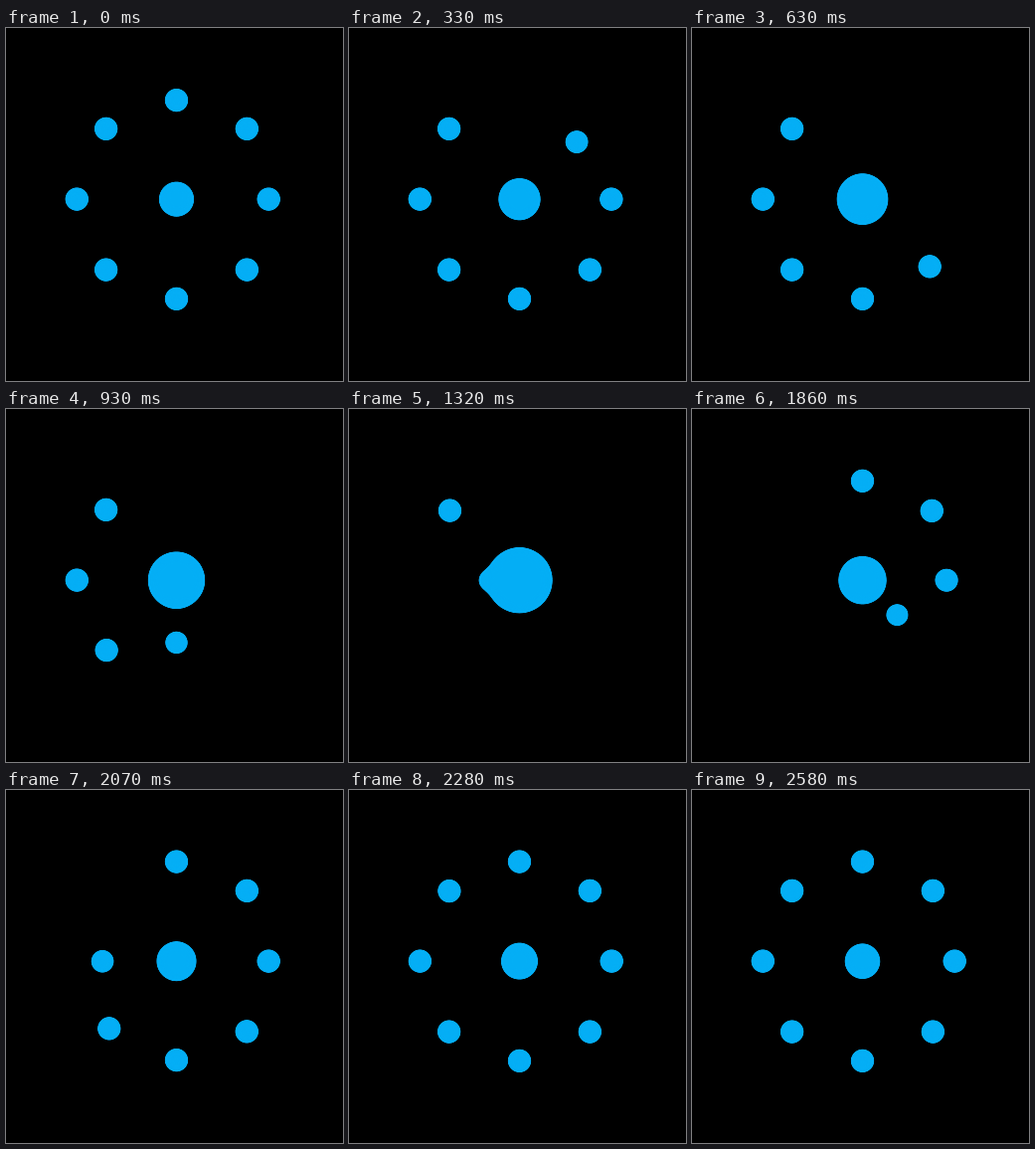
Recreate the animation shown at these times as an HTML page. Size 339x355 px, loop 2.61 s.

```html
<!DOCTYPE html>
<html lang="en">
<head>
<meta charset="utf-8">
<title>Gooey dots</title>
<style>
  html, body { margin: 0; width: 100%; height: 100%; overflow: hidden; background: #000; }
  svg { display: block; width: 100vw; height: 100vh; }
</style>
</head>
<body>
<svg viewBox="0 0 339 355">
  <filter id="goo" filterUnits="userSpaceOnUse" x="0" y="0" width="339" height="355" color-interpolation-filters="sRGB">
    <feGaussianBlur stdDeviation="5"/>
    <feColorMatrix values="1 0 0 0 0  0 1 0 0 0  0 0 1 0 0  0 0 0 18 -8.5"/>
  </filter>
  <g id="dots" fill="#04aef5" filter="url(#goo)"></g>
</svg>
<script>
const LOOP = 2610, STEP = 30, BURST = 1650;
const CX = 171.5, CY = 172.2;
const ARRIVALS = [225, 405, 587, 769, 974, 1151, 1336, 1519];
const group = document.getElementById('dots');

function addCircle() {
  const circle = document.createElementNS('http://www.w3.org/2000/svg', 'circle');
  return group.appendChild(circle);
}

// The blur threshold shrinks small circles, so they are drawn a little larger.
function place(circle, x, y, r) {
  circle.setAttribute('cx', x);
  circle.setAttribute('cy', y);
  circle.setAttribute('r', r + 12.5 / r);
}

const core = addCircle();
const dots = ARRIVALS.map((arrival, i) => ({
  arrival,
  departure: BURST + 62 * i,
  angle: (i - 2) * Math.PI / 4,
  reach: i === 2 ? 92.7 : 100.2,
  circle: addCircle()
}));

// 0 = resting on the ring, 1 = merged into the core
function merged(dot, t) {
  const exponent = t < BURST ? (t - dot.arrival) / 31 : (dot.departure - t) / 24.5;
  return Math.min(1, 2 ** exponent);
}

function draw(t) {
  let mass = 0;
  for (const dot of dots) {
    const k = merged(dot, t);
    const distance = dot.reach * (1 - k);
    mass += k;
    place(dot.circle, CX + distance * Math.cos(dot.angle), CY + distance * Math.sin(dot.angle), 11.5 - 1.3 * k);
  }
  const radius = t < BURST
    ? Math.sqrt(306 + 119 * mass)
    : 17.5 + 18 * 2 ** ((BURST - t) / 148);
  place(core, CX, CY, radius);
}

function tick() {
  draw(Math.floor(performance.now() % LOOP / STEP) * STEP);
  requestAnimationFrame(tick);
}
tick();
</script>
</body>
</html>
```
